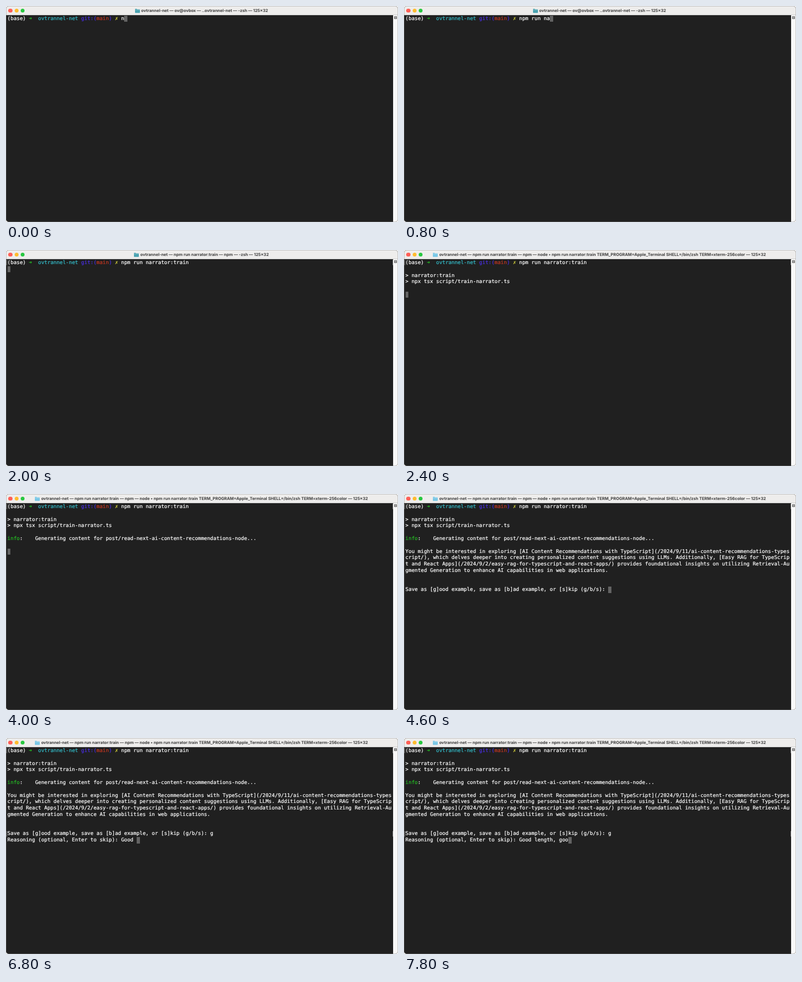
These frames come from a looping animation (720x399 px, 8000 ms). An HTML page:

```html
<!DOCTYPE html>
<html lang="en">
<head>
<meta charset="utf-8">
<title>Terminal session</title>
<style>
  html, body { margin: 0; width: 100%; height: 100%; overflow: hidden; background: #fff; }
  #window {
    position: absolute; left: 0; top: 0; width: 720px; height: 399px;
    overflow: hidden; border-radius: 5px; background: #202020;
    text-rendering: geometricPrecision;
  }
  #window::after {
    content: ""; position: absolute; inset: 0; box-sizing: border-box;
    border: .5px solid #8886; border-radius: 5px;
  }
  #bar {
    position: absolute; left: 0; top: 0; width: 720px; height: 16.5px;
    background: #eeedec; box-sizing: border-box; border-bottom: .5px solid #cfcfcf;
  }
  .light { position: absolute; top: 5.3px; width: 7.2px; height: 7.2px; border-radius: 50%; }
  #caption {
    position: absolute; left: -1px; top: 1px; width: 720px; height: 16px;
    display: flex; justify-content: center; align-items: center;
    font: 700 7.51px/16px Inter, sans-serif; color: #3d3d3d; white-space: pre;
  }
  #folder { width: 9px; height: 8px; margin-right: 2.4px; }
  #screen {
    position: absolute; left: 2.6px; top: 17.9px; margin: 0;
    font: 9.392px/11.82px "DejaVu Sans Mono", monospace; color: #fff; white-space: pre;
    -webkit-text-stroke: .22px currentColor;
  }
  #cursor { display: inline-block; width: 5.9px; height: 11.4px; vertical-align: top; background: #636363; }
  .green { color: #25bc24; }
  .cyan { color: #33bbc8; }
  .blue { color: #492ee1; }
  .red { color: #c23621; }
  .yellow { color: #c5c33a; }
  #scroll { position: absolute; left: 711px; top: 16.5px; width: 9px; height: 383px; background: #f8f8f8; }
  #split {
    position: absolute; left: 2px; top: 2px; width: 5px; height: 5px; box-sizing: border-box;
    border: .8px solid #666; background: linear-gradient(#ddd 40%, #666 40% 62%, #ddd 62%);
  }
  .mark {
    position: absolute; left: .5px; width: 710px; height: 10px; box-sizing: border-box;
    border: solid #777; border-width: 0 1px; visibility: hidden;
  }
</style>
</head>
<body>
<div id="window">
  <div id="bar">
    <i class="light" style="left:4.4px;background:#fe5f57"></i>
    <i class="light" style="left:15.6px;background:#febc2e"></i>
    <i class="light" style="left:26.9px;background:#28c840"></i>
    <div id="caption">
      <svg id="folder" viewBox="0 0 9 8"><path d="M0 1Q0 .3 .7 .3H3L4 1.2H8.3Q9 1.2 9 2V7Q9 7.7 8.3 7.7H.7Q0 7.7 0 7Z" fill="currentColor"/><path d="M0 2.3H9" stroke="#fff" stroke-opacity=".5" stroke-width=".5"/></svg><span id="title"></span>
    </div>
  </div>
  <div class="mark" id="commandMark" style="top:18.3px"></div>
  <div class="mark" id="answerMark" style="top:172px"></div>
  <pre id="screen"><span id="output"></span><span id="cursor"></span></pre>
  <div id="scroll"><div id="split"></div></div>
</div>
<script>
const LOOP = 8000, TICK = 200;
const at = { enter: 2000, script: 2200, info: 3000, reply: 4600, choice: 5800, reason: 6200, note: 6400 };

const command = 'npm run narrator:train';
const note = 'Good length, goo';
const prompt = '(base) <b class="green">➜</b>  <span class="cyan">ovtrannel-net</span> ' +
  '<span class="blue">git:(</span><span class="red">main</span><span class="blue">)</span> ' +
  '<span class="yellow">✗</span> ';
const script = '\n&gt; narrator:train\n&gt; npx tsx script/train-narrator.ts\n\n';
const info = '<span class="green">info</span>:    Generating content for ' +
  'post/read-next-ai-content-recommendations-node...\n\n';
const reply = [
  'You might be interested in exploring [AI Content Recommendations with TypeScript](/2024/9/11/ai-content-recommendations-types',
  'cript/), which delves deeper into creating personalized content suggestions using LLMs. Additionally, [Easy RAG for TypeScrip',
  't and React Apps](/2024/9/2/easy-rag-for-typescript-and-react-apps/) provides foundational insights on utilizing Retrieval-Au',
  'gmented Generation to enhance AI capabilities in web applications.',
  '', '',
  'Save as [g]ood example, save as [b]ad example, or [s]kip (g/b/s): '
].join('\n');

const el = id => document.getElementById(id);
const typed = (text, count) => text.slice(0, Math.max(0, Math.round(count)));

function titleAt(t) {
  const run = `ovtrannel-net — ${command} — npm — `;
  if (t < at.enter) return 'ovtrannel-net — ov@ovbox — ..ovtrannel-net — -zsh — 125×32';
  if (t < at.script) return run + '-zsh — 125×32';
  return run + `node • ${command} TERM_PROGRAM=Apple_Terminal SHELL=/bin/zsh TERM=xterm-256color — 125×32`;
}

function outputAt(t) {
  let out = prompt + typed(command, 1 + 21 * t / 1800);
  if (t >= at.enter) out += '\n';
  if (t >= at.script) out += script;
  if (t >= at.info) out += info;
  if (t >= at.reply) out += reply;
  if (t >= at.choice) out += 'g';
  if (t >= at.reason) out += '\nReasoning (optional, Enter to skip): ' + typed(note, 16 * (t - at.note) / 1400);
  return out;
}

let shown = -1;
function draw(now) {
  const t = Math.floor(now % LOOP / TICK) * TICK;
  if (t !== shown) {
    shown = t;
    el('title').textContent = titleAt(t);
    el('folder').style.color = t < at.script ? '#4aa3b1' : '#79c8e6';
    el('output').innerHTML = outputAt(t);
    el('commandMark').style.visibility = t >= at.enter ? 'visible' : 'hidden';
    el('answerMark').style.visibility = t >= at.reason ? 'visible' : 'hidden';
  }
}

const start = performance.now();
function frame() {
  draw(performance.now() - start);
  requestAnimationFrame(frame);
}
frame();
</script>
</body>
</html>
```
